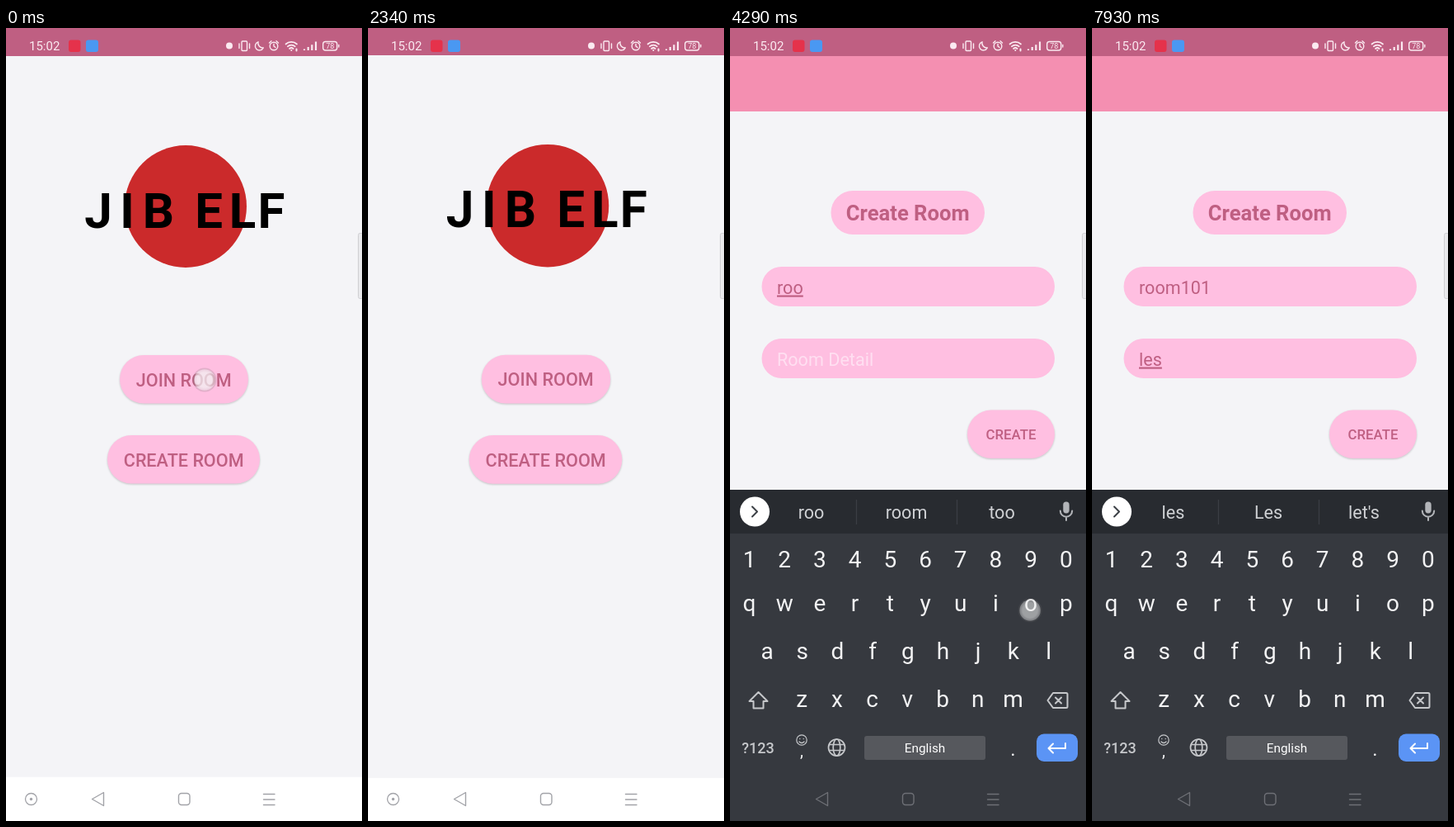
An HTML page for the animation above (8000 ms loop, 432 by 960 pixels).

```html
<!DOCTYPE html>
<html lang="en">
<head>
<meta charset="utf-8">
<title>Room app</title>
<style>
  html, body { margin: 0; width: 100%; height: 100%; overflow: hidden; background: #f4f4f7; }
  svg { display: block; width: 100vw; height: 100vh; font-family: Roboto, "Noto Sans", sans-serif; }
  .line { fill: none; stroke: currentColor; stroke-width: 2; stroke-linecap: round; stroke-linejoin: round; }
  .fill { fill: currentColor; }
  .mid { text-anchor: middle; }
  .pill { fill: #ffbfe1; }
  .raised { filter: drop-shadow(0 1.5px 1.2px rgba(0, 0, 0, .2)); }
  .label { fill: #bf5f82; font-size: 21.6px; font-weight: 500; text-anchor: middle; }
  .input { font-size: 21.6px; fill: #bf5f82; }
  .input.hint { fill: #ffdff1; }
  .input.composing { text-decoration: underline; text-decoration-thickness: 1.3px; }

  .screen, #keyboard, #nav, #row { animation: 8s linear infinite; }
  .screen { transform-origin: 216px 470px; }
  #home { animation-name: home; }
  #join { animation-name: join; }
  #create { animation-name: create; }
  #row { animation-name: row; }
  #keyboard { animation-name: keyboard; }
  #nav { animation-name: nav; }

  @keyframes home {
    0% { transform: none; opacity: 1; }
    1.5% { transform: none; opacity: 1; animation-timing-function: cubic-bezier(.35, .45, 0, 1); }
    6.5%, 26.2% { transform: scale(1.075); opacity: 0; }
    26.25% { transform: scale(1.075); opacity: 1; animation-timing-function: cubic-bezier(.35, .45, 0, 1); }
    31.25% { transform: none; opacity: 1; }
    32% { transform: none; opacity: 1; animation-timing-function: cubic-bezier(.35, .45, 0, 1); }
    37%, 100% { transform: scale(1.075); opacity: 0; }
  }
  @keyframes join {
    0%, 1.5% { transform: scale(.85); opacity: 0; animation-timing-function: cubic-bezier(.35, .45, 0, 1); }
    6.5% { transform: none; opacity: 1; }
    26.25% { transform: none; opacity: 1; animation-timing-function: cubic-bezier(.35, .45, 0, 1); }
    28.5% { opacity: 0; }
    31.25%, 100% { transform: scale(.925); opacity: 0; }
  }
  @keyframes create {
    0%, 32% { transform: scale(.85); opacity: 0; animation-timing-function: cubic-bezier(.35, .45, 0, 1); }
    37%, 100% { transform: none; opacity: 1; }
  }
  @keyframes row {
    0%, 12.8% { opacity: 0; }
    12.81%, 100% { opacity: 1; }
  }
  @keyframes keyboard {
    0%, 37.9% { transform: translateY(401px); animation-timing-function: ease-out; }
    40.2%, 100% { transform: none; }
  }
  @keyframes nav {
    0%, 38% { color: #a2a3a8; }
    38.6%, 41.2% { color: #23262b; }
    42.5%, 100% { color: #6e7076; }
  }
</style>
</head>
<body>
<svg viewBox="0 0 432 960" preserveAspectRatio="none">
  <defs>
    <radialGradient id="touch">
      <stop offset=".7" stop-color="#fff" stop-opacity=".66"/>
      <stop offset="1" stop-color="#fff" stop-opacity=".4"/>
    </radialGradient>
  </defs>
  <rect width="432" height="960" fill="#f4f4f7"/>
  <rect width="432" height="34" fill="#bf5f82"/>
  <rect y="906.5" width="432" height="53.5" fill="#fff"/>
  <g color="#a2a3a8">
    <circle class="line" cx="30.5" cy="933.5" r="7" style="stroke-width:1.3"/>
    <circle class="fill" cx="30.5" cy="933.5" r="1.7"/>
  </g>

  <g id="home" class="screen">
    <rect y="34" width="432" height="872.5" fill="#f4f4f7"/>
    <circle cx="218" cy="216" r="74" fill="#cb2a2b"/>
    <text class="mid" x="112 147 185 215 246 287 322" y="242" font-size="60" font-weight="700">JIB ELF</text>
    <rect class="pill raised" x="138" y="396" width="156" height="58.5" rx="29.2"/>
    <text class="label" x="215.7" y="433.5">JOIN ROOM</text>
    <rect class="pill raised" x="123" y="493" width="185" height="58.5" rx="29.2"/>
    <text class="label" x="215.7" y="530.5">CREATE ROOM</text>
  </g>

  <g id="join" class="screen">
    <rect y="34" width="432" height="872.5" fill="#f4f4f7"/>
    <rect y="34" width="432" height="67" fill="#f48fb1"/>
    <path fill="#fff" transform="translate(388.6 52.6) scale(1.2)" d="M12 6v3l4-4-4-4v3c-4.42 0-8 3.58-8 8 0 1.57.46 3.03 1.24 4.26L6.7 14.8c-.45-.83-.7-1.79-.7-2.8 0-3.31 2.69-6 6-6zm6.76 1.74L17.3 9.2c.44.84.7 1.79.7 2.8 0 3.31-2.69 6-6 6v-3l-4 4 4 4v-3c4.42 0 8-3.58 8-8 0-1.57-.46-3.03-1.24-4.26z"/>
    <g id="row">
      <rect class="pill raised" x="4.5" y="105.5" width="423" height="53.5" rx="8"/>
      <text x="14.5" y="142" font-size="24" fill="#b05a80">ii</text>
      <path d="M386.5 124.5l7.5 7.5-7.5 7.5" fill="none" stroke="#fff" stroke-width="3.4"/>
    </g>
  </g>

  <g id="create" class="screen">
    <rect y="34" width="432" height="872.5" fill="#f4f4f7"/>
    <rect y="34" width="432" height="67" fill="#f48fb1"/>
    <rect class="pill" x="122.5" y="197" width="186.5" height="53" rx="26.5"/>
    <text class="label" x="215.7" y="233" style="font-size:25.6px;font-weight:700">Create Room</text>
    <rect class="pill" x="38.5" y="289" width="355.5" height="48" rx="24"/>
    <rect class="pill" x="38.5" y="376" width="355.5" height="48" rx="24"/>
    <text id="name" class="input" x="57" y="321.5"></text>
    <text id="detail" class="input" x="57" y="408.5"></text>
    <rect class="pill raised" x="288" y="462.5" width="106" height="58.5" rx="29.2"/>
    <text class="label" x="341" y="498" style="font-size:16.8px">CREATE</text>
  </g>

  <g id="keyboard">
    <rect y="559" width="432" height="401" fill="#36393f"/>
    <rect y="559" width="432" height="53" fill="#282b30"/>
    <rect id="pressed" width="37" height="46" rx="3" fill="#4d5057"/>
    <circle cx="30" cy="585.5" r="18" fill="#fff"/>
    <path id="chevron" class="line" color="#3c4046"/>

    <g id="tools" color="#9ea1a6">
      <path class="line" d="M79.5 577h13q2.5 0 2.5 2.5v9l-6 6h-9.5q-2.5 0-2.5-2.5v-12.500q0-2.5 2.5-2.5zM95 588.5h-4q-2 0-2 2v4M81.5 587q3 4 7 1"/>
      <circle class="fill" cx="82.5" cy="582.5" r="1.5"/>
      <circle class="fill" cx="89.5" cy="582.5" r="1.5"/>
      <text class="mid fill" x="146" y="591.5" font-size="16.5" font-weight="900" letter-spacing=".8">GIF</text>
      <path class="line" d="M201 577h14q1.5 0 1.5 1.5v16q0 1.5-1.5 1.5h-14q-1.5 0-1.5-1.5v-16q0-1.5 1.5-1.5zM203.5 584h9M203.5 588h9M203.5 592h5.5"/>
      <rect class="fill" x="204" y="574" width="8" height="6" rx="2"/>
      <circle class="line" cx="270" cy="586" r="5.7" style="stroke-width:4.5"/>
      <circle class="line" cx="270" cy="586" r="8.8" style="stroke-width:3;stroke-linecap:butt;stroke-dasharray:3.8 3.11"/>
      <path d="M307.5 572v27" stroke="#3e4147" stroke-width="1.5"/>
      <path class="line" d="M339 586h.01M346.5 586h.01M354 586h.01" style="stroke-width:5"/>
    </g>
    <g id="words" fill="#cfd1d4">
      <path d="M153.5 571v30M275.5 571v30" stroke="#3b3e44" stroke-width="1.3"/>
      <text class="mid" x="98.5" y="594"></text>
      <text class="mid" x="214" y="594"></text>
      <text class="mid" x="330" y="594"></text>
    </g>
    <g color="#b3b5b9">
      <rect class="fill" x="404.3" y="573.5" width="7.4" height="14" rx="3.7"/>
      <path class="line" d="M400.8 584.5a7.2 7.2 0 0 0 14.4 0M408 592v4"/>
    </g>

    <g id="keys" class="mid" fill="#f3f3f4" font-size="28"></g>

    <g color="#c6c8cb">
      <path class="line" d="M34.5 804l11 11h-5v8.5h-12v-8.5h-5z"/>
      <path class="line" d="M392 805h16q1.5 0 1.5 1.5v15q0 1.5-1.5 1.5h-16l-6.5-9zM395 810.5l7 7M402 810.5l-7 7"/>
      <text class="fill mid" x="34" y="878" font-size="18" font-weight="500">?123</text>
      <circle class="line" cx="87" cy="862" r="6.2" style="stroke-width:1.2"/>
      <path class="line" d="M84.8 860.5h.01M89.2 860.5h.01M84 864q3 3 6 0" style="stroke-width:1.4"/>
      <text class="mid" x="87" y="882" font-size="20" fill="#f3f3f4">,</text>
      <g class="line" style="stroke-width:1.7">
        <circle cx="129.5" cy="871" r="10"/>
        <ellipse cx="129.5" cy="871" rx="4.3" ry="10"/>
        <path d="M120.5 867.5h18M120.5 874.5h18"/>
      </g>
    </g>
    <rect x="163" y="857" width="147" height="29" rx="3" fill="#56585d"/>
    <text class="mid" x="236.5" y="877" font-size="15.3" fill="#fff">English</text>
    <text class="mid" x="343.5" y="881" font-size="24" fill="#f3f3f4">.</text>
    <rect x="372" y="854.5" width="50" height="33.5" rx="9" fill="#5b94f5"/>
    <path class="line" color="#fff" d="M407 866v6h-20M392 866.5l-5.5 5.5 5.5 5.5"/>
  </g>

  <g id="nav">
    <g class="line" style="stroke-width:1.4">
      <path d="M104.5 933.5l14-8v16z"/>
      <rect x="209.5" y="926.5" width="13.5" height="14" rx="3.5"/>
      <path d="M312.5 927.5h13.5M312.5 934h13.5M312.5 940.5h13.5"/>
    </g>
  </g>

  <g color="#fbeaf1">
    <text class="fill" x="28" y="27" font-size="15">15:02</text>
    <rect x="76" y="14.5" width="14.5" height="14.5" rx="3" fill="#e5324b"/>
    <rect x="97" y="14.5" width="15" height="14.5" rx="3" fill="#4a98f2"/>
    <circle class="fill" cx="271" cy="21.5" r="4"/>
    <g class="line" style="stroke-width:1.4">
      <rect x="286" y="16" width="6.5" height="11.5" rx="1"/>
      <path d="M283 19v5.5M295.5 19v5.5"/>
      <path d="M306 16.8a5.2 5.2 0 1 0 6.3 7.2a5.8 5.8 0 0 1-6.3-7.2z"/>
      <circle cx="325" cy="22" r="4.8"/>
      <path d="M325 19.5v2.5l2 1.5M319.5 18l2.5-2.2M330.5 18l-2.5-2.2"/>
      <path d="M339.5 19.5a10 10 0 0 1 13.5 0M341.8 22.3a6.7 6.7 0 0 1 9 0M344 25a3.5 3.5 0 0 1 4.6 0" style="stroke-width:1.7"/>
      <path d="M346.3 27h.01M352.5 25.5v2" style="stroke-width:2"/>
      <path d="M362 25.5v1.5M366.7 23v4M371.3 20.2v6.8M376 16.5v10.5" style="stroke-width:2.2;stroke-linecap:butt"/>
      <rect x="384.7" y="16.5" width="17" height="10.5" rx="3"/>
      <path d="M403.8 20.5v2.5"/>
    </g>
    <text class="fill mid" x="393.2" y="25" font-size="9">78</text>
  </g>

  <rect x="427.5" y="248.5" width="6" height="79" rx="2" fill="#e9e9ec" stroke="#cfcfd3"/>
  <g id="dot">
    <circle r="14.5" fill="#777" fill-opacity=".22"/>
    <circle r="12.8" fill="url(#touch)"/>
  </g>
</svg>

<script>
  const LOOP = 8000;
  const FADE = 110;
  const start = performance.now();
  const $ = id => document.getElementById(id);

  // Key rows: characters, first centre, baseline, centre of the key.
  const rows = [
    ['1234567890', 23.5, 653, 642],
    ['qwertyuiop', 23.5, 706, 697],
    ['asdfghjkl', 45, 764, 755],
    ['zxcvbnm', 87.3, 822, 813]
  ];
  const keyAt = {};
  for (const [chars, x0, base, mid] of rows) {
    [...chars].forEach((char, i) => {
      const x = x0 + i * 42.7;
      const key = document.createElementNS('http://www.w3.org/2000/svg', 'text');
      key.setAttribute('x', x);
      key.setAttribute('y', base);
      key.textContent = char;
      $('keys').append(key);
      keyAt[char] = { x, y: mid };
    });
  }

  // Taps on the screens: x, y, down, up.
  const taps = [
    [241, 426, -200, 120],
    [112, 934, 1980, 2090],
    [216, 523, 2420, 2550],
    [397, 872, 5880, 5980]
  ].map(([x, y, down, up]) => ({ x, y, down, up }));

  // Key presses: character, down, up, suggestions after it.
  const presses = [
    ['r', 3550, 3640, 'r|are|R'],
    ['o', 3850, 3940, 'ro|to|so'],
    ['o', 4170, 4265, 'roo|room|too'],
    ['m', 4550, 4640, 'room|rooms|Room'],
    ['1', 4960, 5060, 'room1|room 1|room 1st'],
    ['0', 5230, 5320, 'room10|room 10|room 10th'],
    ['1', 5510, 5650, 'room101|room 101|room 101st'],
    ['l', 6560, 6640, 'l|I|L'],
    ['e', 7220, 7300, 'le|let|Le'],
    ['s', 7735, 7815, 'les|Les|let\'s']
  ].map(([char, down, up, words]) => ({ char, down, up, words }));
  const NEXT_FIELD = 5980;

  for (const { char, down, up } of presses) {
    const { x, y } = keyAt[char];
    taps.push({ x: x - 1, y: y + 8, down, up, key: keyAt[char] });
  }

  function showField(id, text, hint, composing) {
    const el = $(id);
    el.textContent = text || hint;
    el.classList.toggle('hint', !text);
    el.classList.toggle('composing', composing && !!text);
  }

  function showTyping(t) {
    const inDetail = t >= NEXT_FIELD;
    const done = presses.filter(p => p.up <= t);
    const join = list => list.map(p => p.char).join('');
    const name = join(done.filter(p => p.up < NEXT_FIELD));
    const detail = join(done.filter(p => p.up >= NEXT_FIELD));
    showField('name', name, 'Room Name', !inDetail);
    showField('detail', detail, 'Room Detail', inDetail);

    const typing = !!(inDetail ? detail : name);
    $('tools').style.display = typing ? 'none' : '';
    $('words').style.display = typing ? '' : 'none';
    $('chevron').setAttribute('d', typing ? 'M27 579.5l6 6-6 6' : 'M33 579.5l-6 6 6 6');
    if (!typing) return;
    const words = done[done.length - 1].words.split('|');
    $('words').querySelectorAll('text').forEach((el, i) => {
      el.textContent = words[i];
      el.style.fontSize = words[i].length > 8 ? '20px' : '21.6px';
    });
  }

  function showTouch(t) {
    const tap = taps.find(p => t >= p.down && t < p.up + FADE);
    $('dot').style.opacity = tap ? Math.min(1, (t - tap.down) / 40, (tap.up + FADE - t) / FADE) : 0;
    if (tap) $('dot').setAttribute('transform', `translate(${tap.x} ${tap.y})`);

    const key = tap && t < tap.up && tap.key;
    $('pressed').style.display = key ? '' : 'none';
    if (key) {
      $('pressed').setAttribute('x', key.x - 18);
      $('pressed').setAttribute('y', key.y - 23);
    }
  }

  function draw() {
    const t = (performance.now() - start) % LOOP;
    showTyping(t);
    showTouch(t);
    requestAnimationFrame(draw);
  }

  // Put the CSS animations on the same clock as the script.
  document.getAnimations().forEach(a => { a.startTime = start; });
  draw();
</script>
</body>
</html>
```
